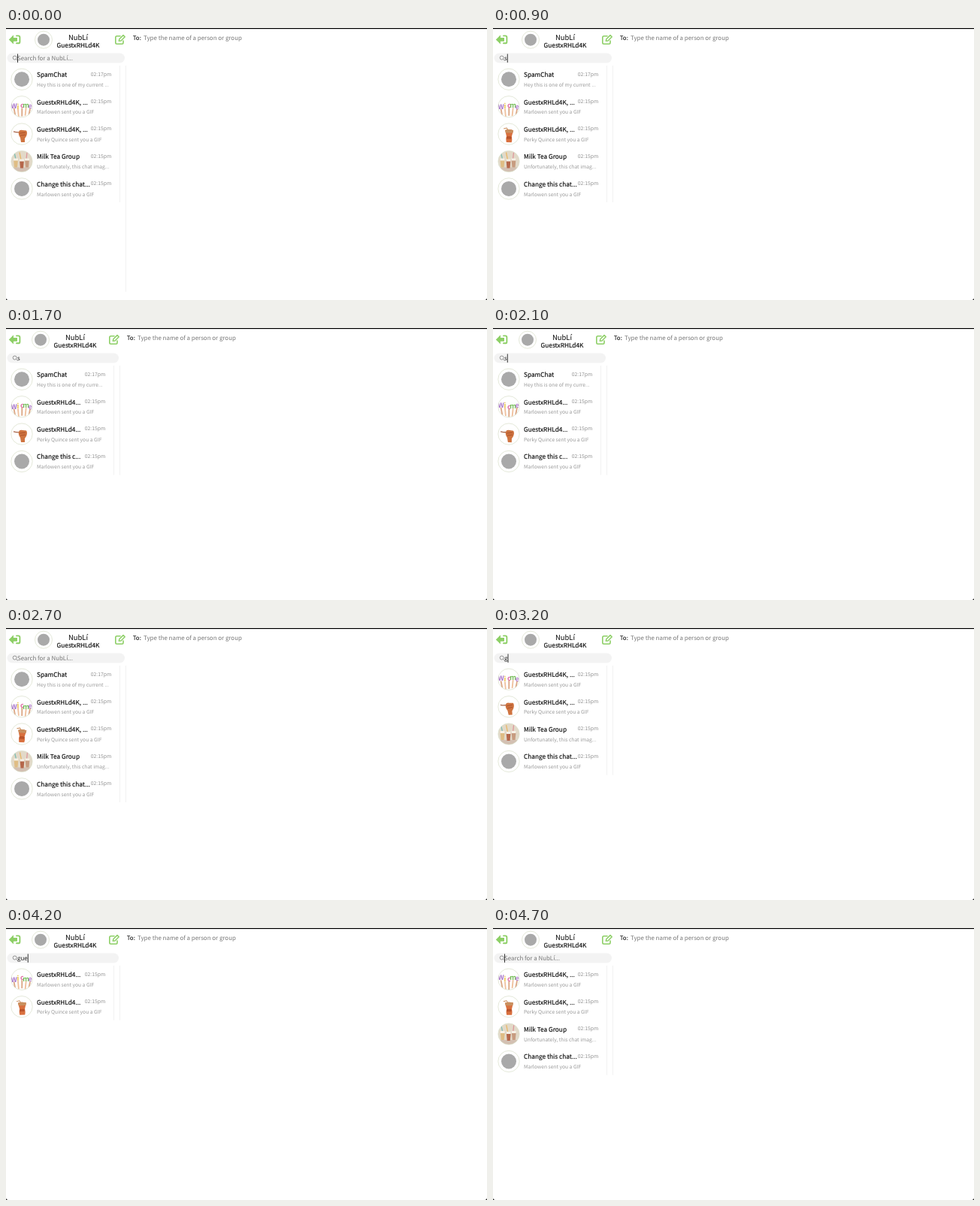
An HTML page that plays this animation: 640x362 px, repeating every 4800 ms.

```html
<!DOCTYPE html>
<html lang="en">
<head>
<meta charset="utf-8">
<title>Chat search</title>
<style>
  html, body { margin: 0; width: 100%; height: 100%; overflow: hidden; background: #fff; }
  svg { display: block; width: 640px; height: 362px; }
  text {
    font-family: "Noto Sans CJK JP", "Noto Sans CJK SC", "Noto Sans CJK TC", "Noto Sans CJK KR", "Noto Sans CJK", "Open Sans", sans-serif;
    font-size: 7.93px;
    text-rendering: geometricPrecision;
    white-space: pre;
  }
  .mid { text-anchor: middle; }
  .name { font-size: 8.27px; stroke: #000; stroke-width: .12; }
  .time { font-size: 6.8px; fill: #919191; text-anchor: end; }
  .note { font-size: 6.72px; fill: #9a9a9a; }
  .hint { fill: #777; }
  .ring { fill: none; stroke: #d9dec9; stroke-width: .7; }
  .rule { stroke: #efefef; stroke-width: .8; }
  .icon { fill: none; stroke: #8dcf66; stroke-width: 1.9; stroke-linejoin: round; stroke-linecap: round; }
  .letter { font-weight: 700; font-size: 9px; }
</style>
</head>
<body>
<svg viewBox="0 0 640 362">
  <defs>
    <clipPath id="disc"><circle r="14"/></clipPath>

    <g id="plain"><circle r="10" fill="#a9a9a9"/></g>

    <g id="hands">
      <rect x="-14" y="-14" width="28" height="28" fill="#fff"/>
      <g id="letters"></g>
    </g>

    <g id="drink">
      <rect x="-14" y="-14" width="28" height="28" fill="#fff"/>
      <g id="fist">
        <path d="M-11-3.2Q-5-1.5 1-3" fill="none" stroke="#a8674a" stroke-width="1.3"/>
        <path d="M-4-3Q-3-6 1-5L6-4.5Q8-2 6 3L4 6V11H-1L-2 5Q-5 1-4-3Z" fill="#cf7440"/>
        <path d="M-3-1L5-2M-2 2L5 1" stroke="#a94f27" stroke-width=".9"/>
      </g>
      <g id="cup">
        <path d="M0-4L-3-8L-7-7" fill="none" stroke="#c98a58" stroke-width="1"/>
        <path d="M-5-5Q0-7 6-5L4 3Q5 8 4 11H-3Q-4 7-3 3Z" fill="#d9703e"/>
        <path d="M-5-5Q0-7 6-5L5.4-1.5H-4.2Z" fill="#c9905f"/>
        <path d="M-3 4Q0 2 4 4L3.5 6.5H-3Z" fill="#b9532b"/>
      </g>
    </g>

    <g id="tea">
      <rect x="-14" y="-14" width="28" height="28" fill="#e2d9c8"/>
      <rect x="-14" y="8" width="28" height="6" fill="#d3c0b2"/>
      <g id="cups">
        <path d="M-8-3L-10-12" stroke="#7cbdb4" stroke-width="1.3"/>
        <path d="M-1-2L-3-12" stroke="#e8b868" stroke-width="1.3"/>
        <path d="M6-3L7-12" stroke="#dd979b" stroke-width="1.3"/>
        <path d="M-11-3H-5L-6 8H-10Z" fill="#dfbd84"/>
        <path d="M-3-2H3L2 9H-2Z" fill="#b5674a"/>
        <path d="M4-3H10L9 8H5Z" fill="#c79c80"/>
        <path d="M-11-4H-5V-1H-11ZM-3-3H3V0H-3ZM4-4H10V-1H4Z" fill="#f6f1e6"/>
      </g>
    </g>
  </defs>

  <rect width="640" height="362" fill="#fff"/>
  <rect width="640" height="1.2" fill="#000"/>
  <path d="M0 359.5Q.3 361.7 2.5 362H0ZM640 359.5Q639.7 361.7 637.5 362H640Z" fill="#000"/>

  <path d="M3.8 15.4L10 9.3V13H15V17.8H10V21.5Z" fill="#8dcf66"/>
  <path class="icon" d="M14 10.4H16.4Q18.4 10.4 18.4 12.4V18.4Q18.4 20.3 16.4 20.3H14"/>

  <g id="brand">
    <circle class="ring" cx="50" cy="15.7" r="11.5"/>
    <circle cx="50" cy="15.7" r="8" fill="#a9a9a9"/>
    <text class="mid" x="96" y="16.1" style="font-size:9.4px">NubLí</text>
    <text class="mid name" x="96" y="26">GuestxRHLd4K</text>
  </g>

  <g id="side">
    <path class="icon" style="stroke-width:1.6" d="M152 10.8H147.5Q145.8 10.8 145.8 12.5V19.6Q145.8 21.3 147.5 21.3H154.3Q156 21.3 156 19.6V17"/>
    <path class="icon" style="stroke-width:1.5" d="M150.3 17.3L150.8 14.8L156 9.6L158.2 11.8L153 17Z"/>
    <text x="168.7" y="16">To:</text>
    <text class="hint" x="183" y="16">Type the name of a person or group</text>
    <line id="inner" class="rule" x1="151.5" x2="151.5" y1="50"/>
    <line id="outer" class="rule" x1="159.5" x2="159.5" y1="50"/>
  </g>

  <rect id="bar" x="1.5" y="33.5" height="13" rx="6.5" fill="#f3f3f3"/>
  <circle cx="11.7" cy="39.6" r="2.5" fill="none" stroke="#888" stroke-width=".9"/>
  <path d="M13.5 41.5L15.5 43.5" stroke="#888" stroke-width=".9"/>
  <text id="hint" class="hint" x="15" y="43.2">Search for a NubLí...</text>
  <text id="query" x="15" y="43.2" fill="#222"></text>
  <rect id="caret" y="34.5" width=".9" height="11.5" fill="#222"/>

  <g id="list"></g>
</svg>

<script>
const NS = 'http://www.w3.org/2000/svg';
const LOOP = 4800, PITCH = 36.4;
const $ = id => document.getElementById(id);

function add(parent, tag, attrs, text = '') {
  const el = parent.appendChild(document.createElementNS(NS, tag));
  for (const key in attrs) el.setAttribute(key, attrs[key]);
  el.textContent = text;
  return el;
}

// inset: how much narrower the sidebar gets when this is the longest row
const guest = 'GuestxRHLd4K, Marlowen';
const chats = [
  { name: 'SpamChat', pic: 'plain', time: '02:17pm', inset: 27,
    label: () => 'SpamChat',
    note: d => 'Hey this is one of my ' + (d > 8 ? '....' : d ? 'curre...' : 'current ...') },
  { name: guest, pic: 'hands', inset: 8,
    label: d => d ? 'GuestxRHLd4...' : 'GuestxRHLd4K, ...',
    note: () => 'Marlowen sent you a GIF' },
  { name: guest, pic: 'drink', inset: 8,
    label: d => d ? 'GuestxRHLd4...' : 'GuestxRHLd4K, ...',
    note: () => 'Perky Quince sent you a GIF' },
  { name: 'Milk Tea Group', pic: 'tea', inset: 0,
    label: () => 'Milk Tea Group',
    note: () => 'Unfortunately, this chat imag...' },
  { name: 'Change this chat name', pic: 'plain', inset: 8,
    label: d => d ? 'Change this c...' : 'Change this chat...',
    note: () => 'Marlowen sent you a GIF' }
];

for (const chat of chats) {
  const row = chat.row = add($('list'), 'g', {});
  add(row, 'use', { href: '#' + chat.pic, transform: 'translate(21 0)', 'clip-path': 'url(#disc)' });
  add(row, 'circle', { class: 'ring', cx: 21, r: 14.2 });
  chat.nameEl = add(row, 'text', { class: 'name', x: 41, y: -3.2 });
  chat.timeEl = add(row, 'text', { class: 'time', y: -4.7 }, chat.time || '02:15pm');
  chat.noteEl = add(row, 'text', { class: 'note', x: 41, y: 9.8 });
}

const tints = ['#a673c9', '#e3b92f', '#df6fa6', '#72bd55', '#b784d2'];
const letters = [...'Wicme'].map((ch, i) => {
  const g = add($('letters'), 'g', {});
  const x = -10.5 + i * 5.4;
  add(g, 'path', { d: `M${x} 2L${x * .8} 13`, stroke: i % 2 ? '#efc09c' : '#dba684', 'stroke-width': 1.8 });
  add(g, 'text', { class: 'letter mid', x, y: 2, fill: tints[i] }, ch);
  return g;
});

// [start, typed text, text the list is filtered by]
const steps = [
  [0, '', ''], [800, 's', ''], [1000, 'sp', 's'], [1100, 'sp', 'sp'],
  [1600, 's', 'sp'], [1700, 's', 's'], [2300, '', 's'], [2400, '', ''],
  [3100, 'g', ''], [3200, 'g', 'g'], [3300, 'gu', 'g'], [3400, 'gue', 'gu'],
  [4500, 'gu', 'gu'], [4600, 'g', 'gu'], [4700, '', 'g']
];

function shift(id, x) { $(id).setAttribute('transform', `translate(${x} 0)`); }

function drawPictures(t) {
  letters.forEach((g, i) =>
    g.setAttribute('transform', `translate(0 ${Math.sin(t / 400 * Math.PI + i * 1.7) * 1.2})`));
  const phase = t % 1700 / 1700;
  const cup = phase > .3 && phase < .85;
  $('cup').style.display = cup ? '' : 'none';
  $('fist').style.display = cup ? 'none' : '';
  const tilt = Math.sin(phase * 4 * Math.PI) * 4;
  $('cup').setAttribute('transform', `rotate(${tilt})`);
  $('fist').setAttribute('transform', `rotate(${tilt})`);
  shift('cups', Math.sin(t / 600 * Math.PI) * .5);
}

function draw(time) {
  const t = Math.floor(time % LOOP / 100) * 100;
  const [, typed, filter] = steps.findLast(s => s[0] <= t);
  const shown = chats.filter(c => c.name.toLowerCase().includes(filter));
  const inset = Math.min(...shown.map(c => c.inset));

  for (const chat of chats) {
    const i = shown.indexOf(chat);
    chat.row.style.display = i < 0 ? 'none' : '';
    if (i < 0) continue;
    chat.row.setAttribute('transform', `translate(0 ${68.3 + i * PITCH})`);
    chat.nameEl.textContent = chat.label(inset);
    chat.noteEl.textContent = chat.note(inset);
    chat.timeEl.setAttribute('x', 140.3 - inset);
  }

  shift('brand', -inset / 2);
  shift('side', -inset);
  $('bar').setAttribute('width', 156.5 - inset);
  const bottom = 50 + shown.length * PITCH;
  $('inner').setAttribute('y2', bottom);
  $('outer').setAttribute('y2', t < 700 ? 351 : bottom);

  $('hint').style.display = typed ? 'none' : '';
  $('query').textContent = typed;
  const width = typed ? $('query').getComputedTextLength() : 0;
  $('caret').setAttribute('x', 15.1 + width);
  const justTyped = t >= 800 && t < 1000 || t >= 4500;
  $('caret').style.display = t % 1000 < 500 || justTyped ? '' : 'none';

  drawPictures(t);
}

const start = performance.now();
function tick() {
  draw(performance.now() - start);
  requestAnimationFrame(tick);
}
tick();
</script>
</body>
</html>
```
